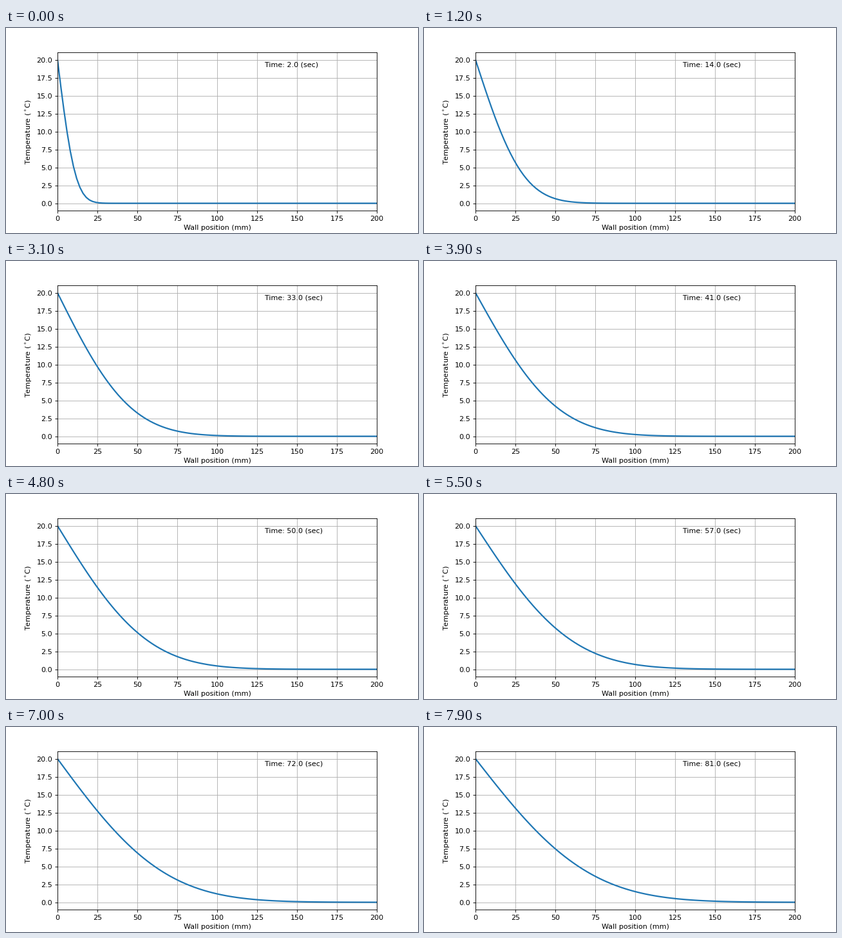
Animation of 640 by 320 pixels, one loop 8 s. Source, as a matplotlib script:

```python
from math import erfc, sqrt

import matplotlib.pyplot as plt
import numpy as np
from matplotlib.animation import FuncAnimation

FRAMES = 80
INTERVAL = 100       # ms
START = 2.0          # s
SURFACE_TEMP = 20.0  # deg C
DIFFUSIVITY = 19.4   # mm^2/s

plt.rcParams["font.family"] = "DejaVu Sans"

x = np.linspace(0, 200, 101)


def profile(t):
    """Temperature in a thick wall whose surface is suddenly heated."""
    depth = 2 * sqrt(DIFFUSIVITY * t)
    return [SURFACE_TEMP * erfc(pos / depth) for pos in x]


fig, ax = plt.subplots(figsize=(8, 4), dpi=80)
ax.set_xlim(0, 200)
ax.set_ylim(-1, 21)
ax.set_xlabel("Wall position (mm)")
ax.set_ylabel(r"Temperature ($^\circ$C)")
ax.grid()

line, = ax.plot(x, profile(START), color="C0", lw=2)
label = ax.text(130, 19, "")


def update(frame):
    t = START + frame * INTERVAL / 100
    line.set_ydata(profile(t))
    label.set_text(f"Time: {t:.1f} (sec)")
    return line, label


anim = FuncAnimation(fig, update, frames=FRAMES, interval=INTERVAL,
                     repeat=True, repeat_delay=0)
plt.show()
```
